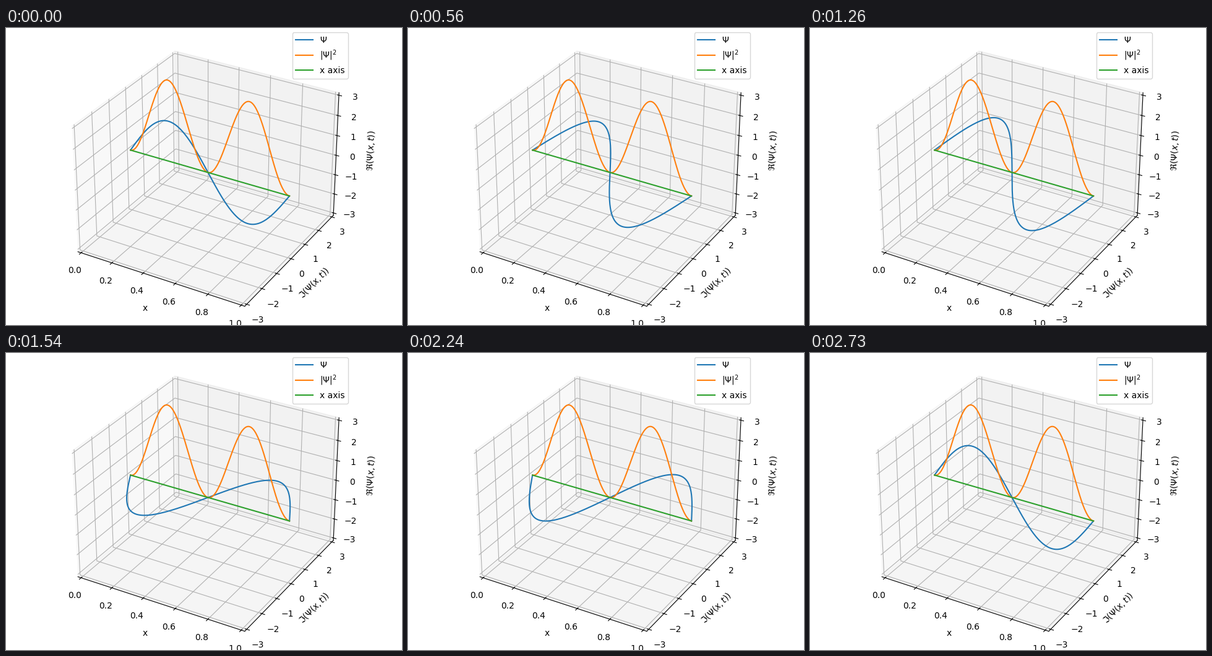
These frames come from a looping animation (640x480 px, 2800 ms). A matplotlib script:

```python
import numpy as np
import matplotlib.pyplot as plt
from matplotlib.animation import FuncAnimation

FRAMES = 40
INTERVAL = 70
LEVEL = 2        # quantum number of the standing wave
AMPLITUDE = 2.0


def padded(low, high):
    """Limits with a small margin so the end ticks sit inside the box."""
    margin = (high - low) / 48
    return low - margin, high + margin


x = np.linspace(0, 1, 201)
zero = np.zeros_like(x)
shape = AMPLITUDE * np.sin(LEVEL * np.pi * x)

fig = plt.figure(figsize=(6.4, 4.8), dpi=100)
ax = fig.add_axes([0, 0, 1, 1], projection="3d")

wave, = ax.plot(x, zero, shape, label=r"$\Psi$")
ax.plot(x, zero, shape**2, label=r"$|\Psi|^2$")
ax.plot(x, zero, zero, label="x axis")

ax.set_xlim(*padded(0, 1))
ax.set_ylim(*padded(-3, 3))
ax.set_zlim(*padded(-3, 3))
ax.set_xlabel("x")
ax.set_ylabel(r"$\Im(\Psi(x,t))$")
ax.set_zlabel(r"$\Re(\Psi(x,t))$")
ax.legend(loc="upper right")


def update(frame):
    # The phase turns LEVEL**2 times; the last frame meets the first.
    t = frame / (FRAMES - 1)
    psi = shape * np.exp(-2j * np.pi * LEVEL**2 * t)
    wave.set_data_3d(x, psi.imag, psi.real)
    return wave,


def reset():
    return update(0)


anim = FuncAnimation(fig, update, frames=FRAMES, init_func=reset,
                     interval=INTERVAL, repeat=True, repeat_delay=0)

plt.show()
```
